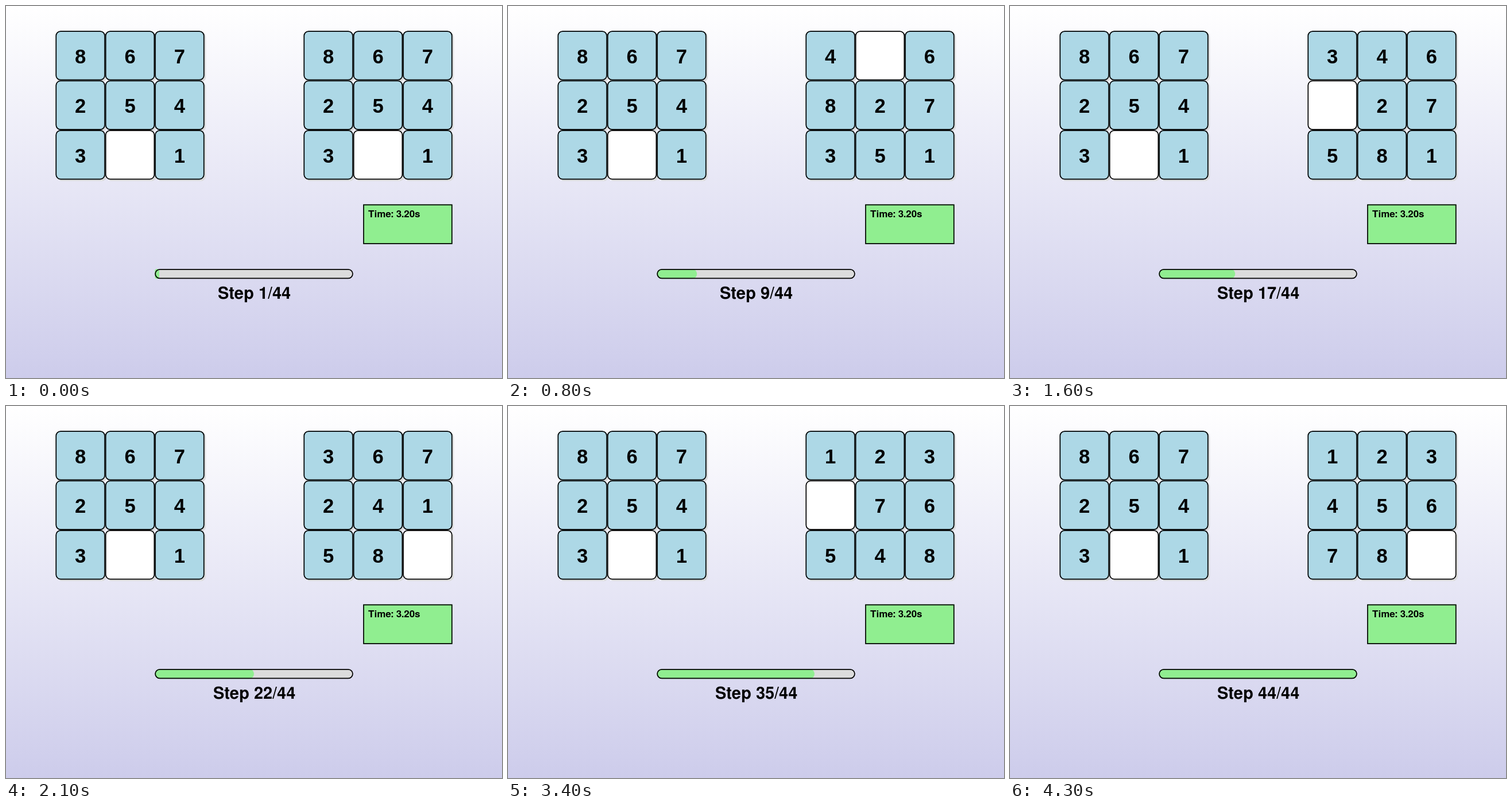
An HTML page with a canvas that plays this animation: 864x648 px, repeating every 4400 ms.

```html
<!DOCTYPE html>
<html lang="en">
<head>
<meta charset="utf-8">
<title>Sliding puzzle replay</title>
<style>
  html, body { margin: 0; width: 100%; height: 100%; overflow: hidden; }
  canvas { display: block; }
</style>
</head>
<body>
<canvas id="stage" width="864" height="648"></canvas>
<script>
const ctx = document.getElementById("stage").getContext("2d");

// Layout is in units of a 1000 x 750 window.
const SCALE = 0.864, W = 1000, H = 750, TILE = 100;
const STEP_MS = 100;
const SANS = '"FreeSans", "Liberation Sans", Arial, sans-serif';
const NARROW = '"Liberation Sans Narrow", "Arial Narrow", "Liberation Sans", Arial, sans-serif';

// The board is read row by row; 0 is the gap. Each letter moves the gap.
const START = [8, 6, 7, 2, 5, 4, 3, 0, 1];
const MOVES = "URULDLUR" + "DLDRUULD" + "RURDD" + "LURULL" + "DRRULLD" + "RLRDLURDR";
const SHIFT = { U: -3, D: 3, L: -1, R: 1 };

function slide(board, move) {
  const next = board.slice();
  const gap = next.indexOf(0);
  const other = gap + SHIFT[move];
  next[gap] = next[other];
  next[other] = 0;
  return next;
}

const boards = [START];
for (const move of MOVES) boards.push(slide(boards[boards.length - 1], move));
const TOTAL = boards.length;

const sky = ctx.createLinearGradient(0, 0, 0, H);
sky.addColorStop(0, "rgb(255,255,255)");
sky.addColorStop(1, "rgb(205,204,235)");

function fillRound(x, y, w, h, r, color) {
  ctx.beginPath();
  ctx.roundRect(x, y, w, h, r);
  ctx.fillStyle = color;
  ctx.fill();
}

// A 2 unit outline that stays inside the box.
function outline(x, y, w, h, r) {
  ctx.beginPath();
  ctx.roundRect(x + 1, y + 1, w - 2, h - 2, Math.max(0, r - 1));
  ctx.strokeStyle = "#000";
  ctx.lineWidth = 2;
  ctx.stroke();
}

function label(text, x, y, size, family, align) {
  ctx.font = `bold ${size}px ${family}`;
  ctx.textAlign = align;
  ctx.fillStyle = "#000";
  ctx.fillText(text, x, y);
}

function drawBoard(board, left, top) {
  board.forEach((value, i) => {
    const x = left + (i % 3) * TILE;
    const y = top + Math.floor(i / 3) * TILE;
    fillRound(x + 3, y + 3, TILE, TILE, 10, "rgb(220,220,220)");
    fillRound(x, y, TILE, TILE, 10, value ? "rgb(173,216,230)" : "#fff");
    outline(x, y, TILE, TILE, 10);
    if (value) label(String(value), x + 50, y + 65.5, 40, NARROW, "center");
  });
}

function drawTimeBox() {
  fillRound(720, 400, 180, 80, 0, "rgb(144,238,144)");
  outline(720, 400, 180, 80, 0);
  label("Time: 3.20s", 730, 426.3, 19.5, SANS, "left");
}

function drawProgress(step) {
  fillRound(300, 530, 400, 20, 10, "rgb(220,220,220)");
  fillRound(300, 530, Math.floor(400 * step / TOTAL), 20, 10, "rgb(144,238,144)");
  outline(300, 530, 400, 20, 10);
  label(`Step ${step}/${TOTAL}`, 500.5, 590, 33.4, SANS, "center");
}

function draw() {
  const index = Math.floor(performance.now() / STEP_MS) % TOTAL;
  ctx.setTransform(SCALE, 0, 0, SCALE, 0, 0);
  ctx.fillStyle = sky;
  ctx.fillRect(0, 0, W, H);
  drawBoard(START, 100, 50);
  drawBoard(boards[index], 600, 50);
  drawTimeBox();
  drawProgress(index + 1);
  requestAnimationFrame(draw);
}

draw();
</script>
</body>
</html>
```
